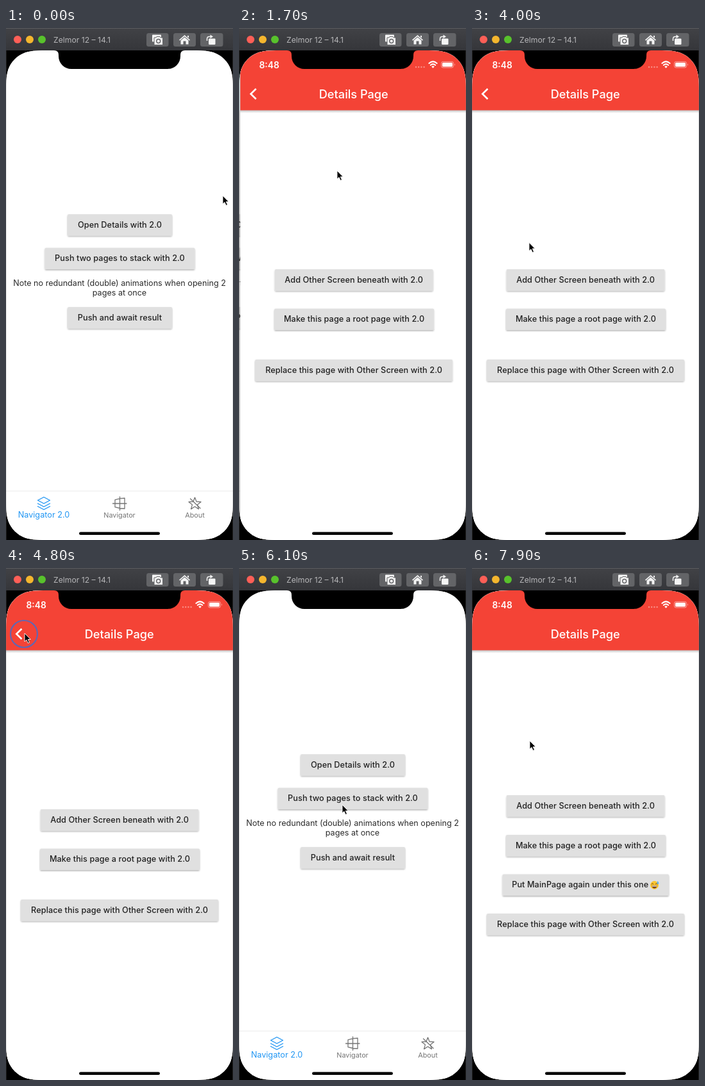
Write an HTML page that moves like this. It is 354 by 800 pixels and loops after 8 s.

```html
<!DOCTYPE html>
<html lang="en">
<head>
<meta charset="utf-8">
<title>Page navigation demo</title>
<style>
  html, body { margin: 0; width: 100%; height: 100%; overflow: hidden; background: #000; }
  svg { display: block; width: 354px; height: 800px; }
  text { font-family: Inter, Roboto, sans-serif; }
  .line { fill: none; stroke-linejoin: round; stroke-linecap: round; }
  .label { font-size: 12.7px; font-weight: 500; letter-spacing: .08px; fill: #212121; text-anchor: middle; }
  .note { font-size: 12.6px; fill: #2b2b2b; text-anchor: middle; }
  .tab { font-size: 10.8px; fill: #757575; text-anchor: middle; }
  .tab.on { font-size: 12.7px; fill: #2196f3; }
</style>
</head>
<body>
<svg viewBox="0 0 354 800">
  <defs>
    <linearGradient id="bar" x2="0" y2="1">
      <stop stop-color="#414246"/><stop offset="1" stop-color="#35363a"/>
    </linearGradient>
    <linearGradient id="edge">
      <stop stop-opacity="0"/><stop offset=".3" stop-opacity=".016"/>
      <stop offset=".6" stop-opacity=".07"/><stop offset="1" stop-opacity=".22"/>
    </linearGradient>
    <linearGradient id="drop" x2="0" y2="1">
      <stop stop-opacity=".26"/><stop offset="1" stop-opacity="0"/>
    </linearGradient>
    <filter id="lift" x="-5%" y="-20%" width="110%" height="150%">
      <feDropShadow dx="0" dy="1.4" stdDeviation="1" flood-opacity=".3"/>
    </filter>
    <clipPath id="screen"><path id="outline"/></clipPath>
  </defs>

  <rect width="354" height="800"/>

  <g clip-path="url(#screen)">
    <rect y="35" width="354" height="765" fill="#fff"/>

    <g id="main">
      <rect y="35" width="354" height="765" fill="#fff"/>
      <g id="mainButtons"></g>
      <text class="note" x="177" y="402.5">Note no redundant (double) animations when opening 2</text>
      <text class="note" x="177" y="418">pages at once</text>
      <path d="M0 723.5H354" stroke="#ececec"/>
      <g class="line" stroke="#2196f3" stroke-width="1.4">
        <path d="M59 733L68.500 738L59 743L49.500 738Z"/>
        <path d="M49.500 743L59 748L68.500 743M49.500 747.500L59 752.500L68.500 747.500"/>
      </g>
      <g class="line" stroke="#757575" stroke-width="1.3">
        <path d="M170 737Q177 735 185 734.500V751Q177 750.500 170 748.500ZM177.500 732.500V753.500M166.500 743H188"/>
        <path id="star"/>
        <path d="M287.500 735.500L303 750.500"/>
      </g>
      <text class="tab on" x="59" y="765">Navigator 2.0</text>
      <text class="tab" x="177" y="765">Navigator</text>
      <text class="tab" x="294.500" y="765">About</text>
    </g>

    <g id="details">
      <rect id="shade" x="-18" y="35" width="18" height="765" fill="url(#edge)"/>
      <rect y="35" width="354" height="765" fill="#fff"/>
      <rect y="128" width="354" height="5" fill="url(#drop)"/>
      <rect y="35" width="354" height="93.500" fill="#f44336"/>
      <text x="176.700" y="109.500" font-size="18.200" font-weight="500" fill="#fff" text-anchor="middle">Details Page</text>
      <path id="back" d="M24.500 95L16.300 103L24.500 111" fill="none" stroke="#fff" stroke-width="2.600"/>
      <g id="stackButtons"></g>
      <g id="rootButtons"></g>
    </g>

    <g fill="#fff">
      <text x="31.500" y="63" font-size="13.800" font-weight="600">8:48</text>
      <g fill-opacity=".4" id="dots"></g>
      <g class="line" stroke="#fff" stroke-width="2">
        <path d="M296.300 55.200Q302.500 49.600 308.700 55.200M298.800 58Q302.500 54.800 306.200 58"/>
      </g>
      <path d="M300.200 60.300Q302.500 58.400 304.800 60.300L302.500 62.700Z"/>
      <rect x="315.500" y="52.500" width="19" height="9.500" rx="2.700" fill="none" stroke="#fff" stroke-opacity=".5"/>
      <rect x="317" y="54" width="16" height="6.500" rx="1.500"/>
      <path d="M336 55.500Q337.800 57.200 336 59Z" fill-opacity=".6"/>
    </g>
  </g>

  <path d="M75 35Q82 35 82 42V44A20 20 0 0 0 102 64H252A20 20 0 0 0 272 44V42Q272 35 279 35Z"/>
  <rect x="114" y="787.500" width="126" height="4.600" rx="2.300"/>
  <path d="M.5 35V800M353.500 35V800" stroke="#808080" stroke-opacity=".25"/>

  <rect width="354" height="35" fill="url(#bar)"/>
  <path d="M0 .5H354" stroke="#5b5c60"/>
  <circle cx="18" cy="18" r="6" fill="#fe5f57"/>
  <circle cx="37" cy="18" r="6" fill="#f5b62e"/>
  <circle cx="56" cy="18" r="6" fill="#58c22c"/>
  <text x="74" y="22.500" font-size="12.200" fill="#b6b6b8">Zelmor 12 – 14.1</text>
  <g fill="#636467">
    <rect x="219" y="8" width="34.500" height="21" rx="3.500"/>
    <rect x="261" y="8" width="35" height="21" rx="3.500"/>
    <rect x="303" y="8" width="35.500" height="21" rx="3.500"/>
  </g>
  <g fill="#f4f4f4">
    <rect x="228" y="10.500" width="14" height="11" rx="1"/>
    <path d="M231 15H234L235 13.500H240L241 15H244.500V26.500H231Z" stroke="#636467"/>
    <circle cx="237.700" cy="20.500" r="3" fill="none" stroke="#636467" stroke-width="1.400"/>
    <path d="M278.500 11L287 18.500L286 19.700L278.500 13.200L271 19.700L270 18.500ZM283 12H285V15.500L283 14Z"/>
    <path d="M272.500 19.500L278.500 14.500L284.500 19.500V25.500H280.500V20.500H276.500V25.500H272.500Z"/>
    <rect x="316" y="16.500" width="10.500" height="9.500" rx="1.300"/>
    <path d="M313.500 20V17Q313.500 13.500 317 13.500H319" fill="none" stroke="#f4f4f4" stroke-width="1.500"/>
    <path d="M318.500 10.500L323 13.500L318.500 16.200Z"/>
  </g>

  <circle id="ring" r="21" fill="none" stroke="#6466b0" stroke-width="2.200"/>
  <path id="cursor" d="M0 0V13L3 10.300L5.200 15.300L7.500 14.300L5.300 9.500H9.300Z" stroke="#fff" stroke-width=".9"/>
</svg>

<script>
const $ = id => document.getElementById(id);
const LOOP = 8000, STEP = 100, WIDTH = 354;

const button = (x, y, w, label, shift = 0) =>
  `<rect x="${x}" y="${y}" width="${w}" height="33.500" rx="2" fill="#e0e0e0" filter="url(#lift)"/>
   <text class="label" x="${x + w / 2 + shift}" y="${y + 20.500}">${label}</text>`;

const face = (x, y) =>
  `<g transform="translate(${x} ${y})">
     <circle r="6.500" fill="#fbc52f"/>
     <path d="M-4 .5H4Q3.500 5 0 5T-4 .5Z" fill="#70401f"/>
     <path d="M-3.500 1H3.500V2.200H-3.500Z" fill="#fff"/>
     <path class="line" d="M-4.500 -1.500Q-3 -4 -1.500 -1.500M1.500 -1.500Q3 -4 4.500 -1.500" stroke="#70401f"/>
     <path d="M5 -6.500Q8.500 -2 5.500 -1.500Q2.500 -2 5 -6.500Z" fill="#59b4ed"/>
   </g>`;

const ADD = "Add Other Screen beneath with 2.0";
const ROOT = "Make this page a root page with 2.0";
const REPLACE = "Replace this page with Other Screen with 2.0";

$("mainButtons").innerHTML =
  button(96, 291, 163, "Open Details with 2.0") +
  button(60.500, 343.500, 234, "Push two pages to stack with 2.0") +
  button(96, 436, 163, "Push and await result");
$("stackButtons").innerHTML =
  button(53.700, 377, 246.800, ADD) + button(53, 438.500, 249, ROOT) + button(23, 518, 308, REPLACE);
$("rootButtons").innerHTML =
  button(53.700, 355, 246.800, ADD) + button(53, 417, 249, ROOT) +
  button(47.500, 478.500, 259.500, "Put MainPage again under this one", -8.500) + face(284.500, 495.500) +
  button(23, 540, 308, REPLACE);

$("dots").innerHTML = [0, 1, 2, 3].map(i => `<circle cx="${276 + i * 4.200}" cy="61" r="1.200"/>`).join("");

$("star").setAttribute("d", "M" + Array.from({ length: 10 }, (_, i) => {
  const a = i * Math.PI / 5 - Math.PI / 2, r = i % 2 ? 4.300 : 10;
  return `${(294.500 + r * Math.cos(a)).toFixed(1)} ${(743.500 + r * Math.sin(a)).toFixed(1)}`;
}).join("L") + "Z");

// screen outline with smooth-curvature corners
const CORNER = [[0, 1.529], [0, 1.088], [0, .868], [.075, .631], [.169, .373],
  [.373, .169], [.631, .075], [.868, 0], [1.088, 0], [1.529, 0]];
function outline(top, bottom, r) {
  const corner = (right, low) => {
    const pts = CORNER.map(([x, y]) =>
      `${right ? WIDTH - x * r : x * r} ${low ? bottom - y * r : top + y * r}`);
    if (right !== low) pts.reverse();
    return `${pts[0]}C${pts.slice(1).join(" ")}`;
  };
  return `M${corner(false, false)}L${corner(true, false)}L${corner(true, true)}L${corner(false, true)}Z`;
}
$("outline").setAttribute("d", outline(35, 800, 47));

// pointer stops: time, x, y
const path = [
  [0, 338, 262], [200, 338, 262], [1100, 168, 308], [1350, 168, 308],
  [1700, 153, 223], [2100, 153, 223], [3000, 110, 417], [3700, 110, 417],
  [4600, 29, 102], [5000, 29, 102], [5900, 161, 370], [6450, 161, 370],
  [6700, 157, 363], [7150, 154, 452], [7400, 154, 452], [7900, 90, 270]
];
const clicks = [[1200, 1400], [4700, 4900], [6300, 6500], [7200, 7400]];
// page slides: start time, whether the details page ends up visible
const slides = [[1345, 1], [4950, 0], [6438, 1]];
const SLIDE = 400, ROOT_AT = 7400;

const clamp = v => Math.min(1, Math.max(0, v));
const smooth = v => v * v * (3 - 2 * v);
const bezier = (a, b, s) => 3 * (1 - s) ** 2 * s * a + 3 * (1 - s) * s * s * b + s ** 3;

// cubic-bezier(.35, .91, .33, .97)
function slideEase(v) {
  if (v <= 0 || v >= 1) return clamp(v);
  let lo = 0, hi = 1;
  for (let i = 0; i < 24; i++) {
    const mid = (lo + hi) / 2;
    if (bezier(.35, .33, mid) < v) lo = mid; else hi = mid;
  }
  return bezier(.91, .97, lo);
}

function pointer(t) {
  const i = path.findIndex(p => p[0] > t);
  if (i < 0) return path[path.length - 1].slice(1);
  const [t0, x0, y0] = path[i - 1], [t1, x1, y1] = path[i];
  const k = smooth((t - t0) / (t1 - t0));
  return [x0 + (x1 - x0) * k, y0 + (y1 - y0) * k];
}

function shown(t) {
  const last = slides.filter(s => s[0] <= t).pop();
  if (!last) return 0;
  const k = slideEase((t - last[0]) / SLIDE);
  return last[1] ? k : 1 - k;
}

const show = (id, on) => $(id).setAttribute("visibility", on ? "visible" : "hidden");
const move = (id, x, y = 0) => $(id).setAttribute("transform", `translate(${x.toFixed(2)} ${y.toFixed(2)})`);

function draw(t) {
  const k = shown(t), root = t >= ROOT_AT;
  move("main", -k * WIDTH / 3);
  move("details", (1 - k) * WIDTH);
  $("details").setAttribute("display", k > 0 ? "inline" : "none");
  $("shade").setAttribute("opacity", k);
  show("back", !root);
  show("stackButtons", !root);
  show("rootButtons", root);

  const [x, y] = pointer(t);
  move("cursor", x, y);
  move("ring", x - 1, y + 1);
  show("ring", clicks.some(([a, b]) => t >= a && t < b));
}

const start = performance.now();
function tick() {
  const t = (performance.now() - start) % LOOP;
  draw(Math.floor(t / STEP) * STEP);
  requestAnimationFrame(tick);
}
tick();
</script>
</body>
</html>
```
